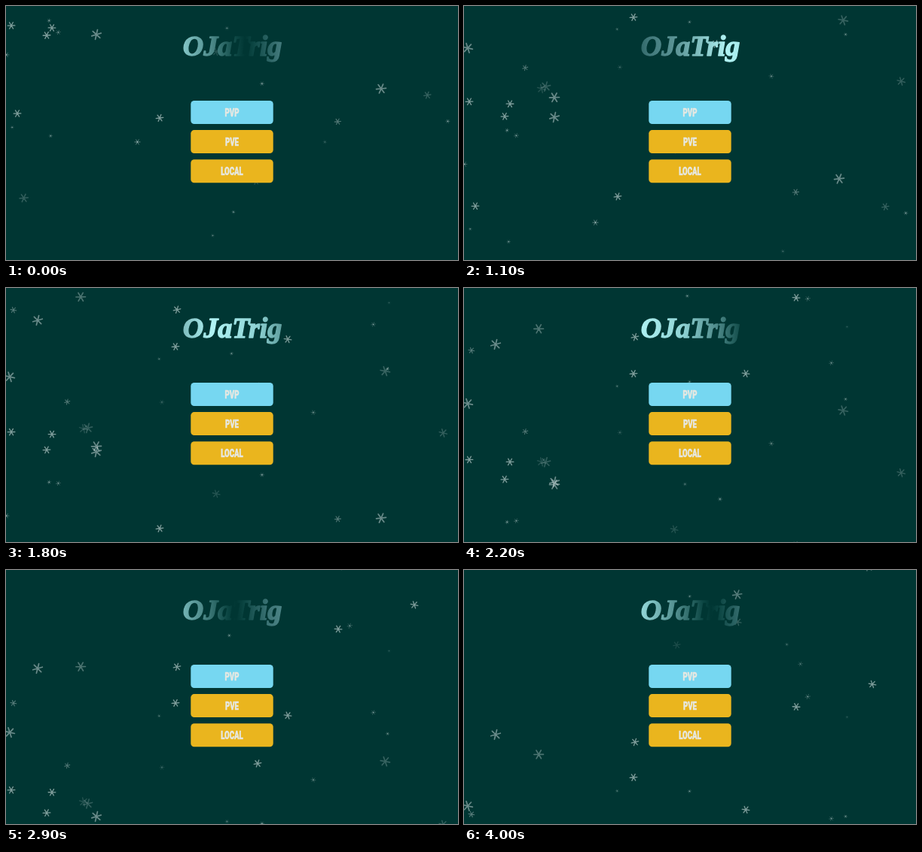
Animation, 600 px wide and 338 px high, one loop 4100 ms. Source, as an HTML page with a canvas:

```html
<!DOCTYPE html>
<html lang="en">
<head>
<meta charset="utf-8">
<title>OJaTrig</title>
<style>
  html, body { margin: 0; height: 100%; overflow: hidden; background: #003633; }
  canvas { display: block; }
</style>
</head>
<body>
<canvas id="stage" width="600" height="338"></canvas>
<script>
const ctx = document.getElementById('stage').getContext('2d');
const LOOP = 4100, STEP = 100;
const BACKGROUND = '#003633', YELLOW = '#eab51e', BLUE = '#76d7f1';

let seed = 11;
const random = () => (seed = seed * 16807 % 2147483647) / 2147483647;
const between = (low, high) => low + random() * (high - low);

// y is the height at the start of the loop, speed is in px/s
const makeFlake = (x, y, speed, radius, alpha) =>
  ({ x, y, speed, radius, alpha, tilt: between(-.3, .3) });

const large = [[120, 38, 100], [120, -18, 127], [498, 110, 109], [42, -101, 80], [5, -42, 89]];
const bright = [[54, 39, 98], [61, 29, 92], [7, 26, 92], [15, 143, 112], [204, 149, 95],
  [334, -76, 115], [374, -137, 114], [227, -135, 91], [225, -84, 90], [441, -194, 94],
  [542, -232, 96]];

const flakes = [
  ...large.map(place => makeFlake(...place, 7.2, .45)),
  ...bright.map(place => makeFlake(...place, 5.4, .55)),
  ...Array.from({ length: 42 }, () => makeFlake(
    between(0, 590), between(-480, 338), between(80, 135),
    2 + 5 * random() ** 2, between(.12, .4))),
];

function drawFlake({ x, y, speed, radius, alpha, tilt }, t) {
  ctx.save();
  ctx.globalAlpha = alpha;
  ctx.translate(x, y + speed * t / 1000);
  ctx.rotate(tilt);
  ctx.strokeStyle = '#e8f2f1';
  ctx.lineCap = 'round';
  ctx.lineWidth = radius * .24;
  ctx.beginPath();
  for (let arm = 0; arm < 6; arm++) {
    ctx.rotate(Math.PI / 3);
    ctx.moveTo(0, 0);
    ctx.lineTo(radius * .9, 0);
  }
  ctx.stroke();
  ctx.restore();
}

// The shine slides left and jumps once where its own cycle restarts
function drawTitle(t) {
  const period = 300, cycles = 4;
  const offset = 317 - .1075 * t + (t >= 3100 ? 141 : 0);
  const start = offset - 2 * period;
  const shine = ctx.createLinearGradient(start, 0, start + cycles * period, 0);
  const stops = [[0, BACKGROUND], [.035, '#0b4542'], [.15, '#3f7678'], [.28, '#5d9698'],
    [.5, '#b0f3f4'], [.7, '#8fd3d4'], [.85, '#4f8b8b'], [.965, '#0b4542']];
  for (let i = 0; i < cycles; i++)
    for (const [at, color] of stops) shine.addColorStop((i + at) / cycles, color);
  ctx.font = 'italic bold 38px "Liberation Serif", serif';
  ctx.lineWidth = 1.4;
  ctx.fillStyle = ctx.strokeStyle = shine;
  ctx.strokeText('OJaTrig', 300.5, 66);
  ctx.fillText('OJaTrig', 300.5, 66);
}

function drawButton(label, row) {
  const y = 126 + 39.1 * row;
  ctx.fillStyle = row ? YELLOW : BLUE;
  ctx.beginPath();
  ctx.roundRect(245.3, y, 109.4, 31, 4.5);
  ctx.fill();
  ctx.save();
  ctx.translate(300, y + 21);
  ctx.scale(.62, 1); // condensed face
  ctx.font = '900 15.5px Roboto, sans-serif';
  ctx.lineWidth = .6;
  ctx.fillStyle = ctx.strokeStyle = '#e6e8e2';
  ctx.strokeText(label, 0, 0);
  ctx.fillText(label, 0, 0);
  ctx.restore();
}

function draw() {
  const t = Math.floor(performance.now() % LOOP / STEP) * STEP;
  ctx.fillStyle = BACKGROUND;
  ctx.fillRect(0, 0, 600, 338);
  ctx.textAlign = 'center';
  ctx.lineJoin = 'round';
  flakes.forEach(flake => drawFlake(flake, t));
  drawTitle(t);
  ['PVP', 'PVE', 'LOCAL'].forEach(drawButton);
  requestAnimationFrame(draw);
}
draw();
</script>
</body>
</html>
```
